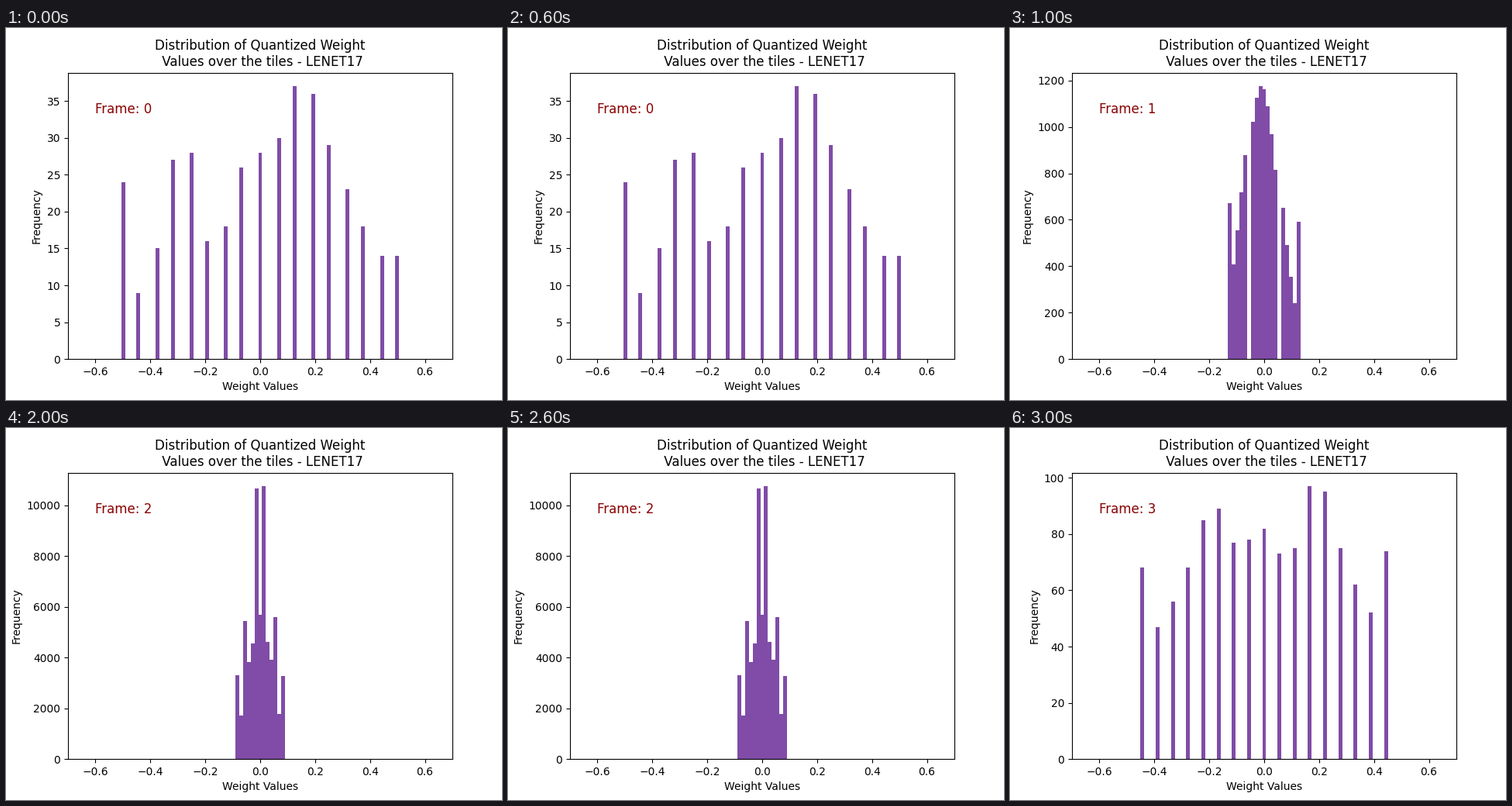
Write a matplotlib script that moves like this. It is 640x480 px and loops after 4000 ms.

```python
import numpy as np
import matplotlib.pyplot as plt
from matplotlib.animation import FuncAnimation

LEVELS = np.arange(-8, 9)
X_RANGE = (-0.7, 0.7)


def bell(peak, mean, spread):
    return peak * np.exp(-((LEVELS - mean) / spread) ** 2 / 2)


def ripple(slope, center, width=1.1):
    x = LEVELS - center
    return slope * x * np.exp(-(x / width) ** 2 / 2)


def clipped(counts, low, high):
    """Round the counts and pile the clipped tails onto the end levels."""
    counts = np.round(counts)
    counts[[0, -1]] = low, high
    return counts


# Each tile: (quantization step, count of weights per level)
TILES = [
    (1 / 16, clipped(bell(34, 0.8, 4.7) + ripple(-18, -3.5) + ripple(9, 1.5), 24, 14)),
    (1 / 64, clipped(bell(1178, -0.7, 4.32), 670, 590)),
    (1 / 100, clipped(bell(5680, 0.05, 4.56), 3300, 3270)),
    (1 / 18, clipped(bell(92, 0.3, 6.3) + ripple(-20, -2.5) + ripple(30, 2.5), 68, 74)),
]

fig, ax = plt.subplots(figsize=(6.4, 4.8), dpi=100)


def draw(index):
    step, counts = TILES[index]
    ax.clear()
    heights, _, _ = ax.hist(LEVELS * step, bins=101, range=X_RANGE,
                            weights=counts, color="indigo", alpha=0.7)
    ax.set_xlim(X_RANGE)
    ax.set_title("Distribution of Quantized Weight\n Values over the tiles - LENET17")
    ax.set_xlabel("Weight Values")
    ax.set_ylabel("Frequency")
    ax.text(-0.6, 0.9 * heights.max(), f"Frame: {index}",
            fontsize=12, color="darkred")


anim = FuncAnimation(fig, draw, frames=len(TILES), interval=1000,
                     init_func=lambda: draw(0), repeat=True, repeat_delay=0)
plt.show()
```
